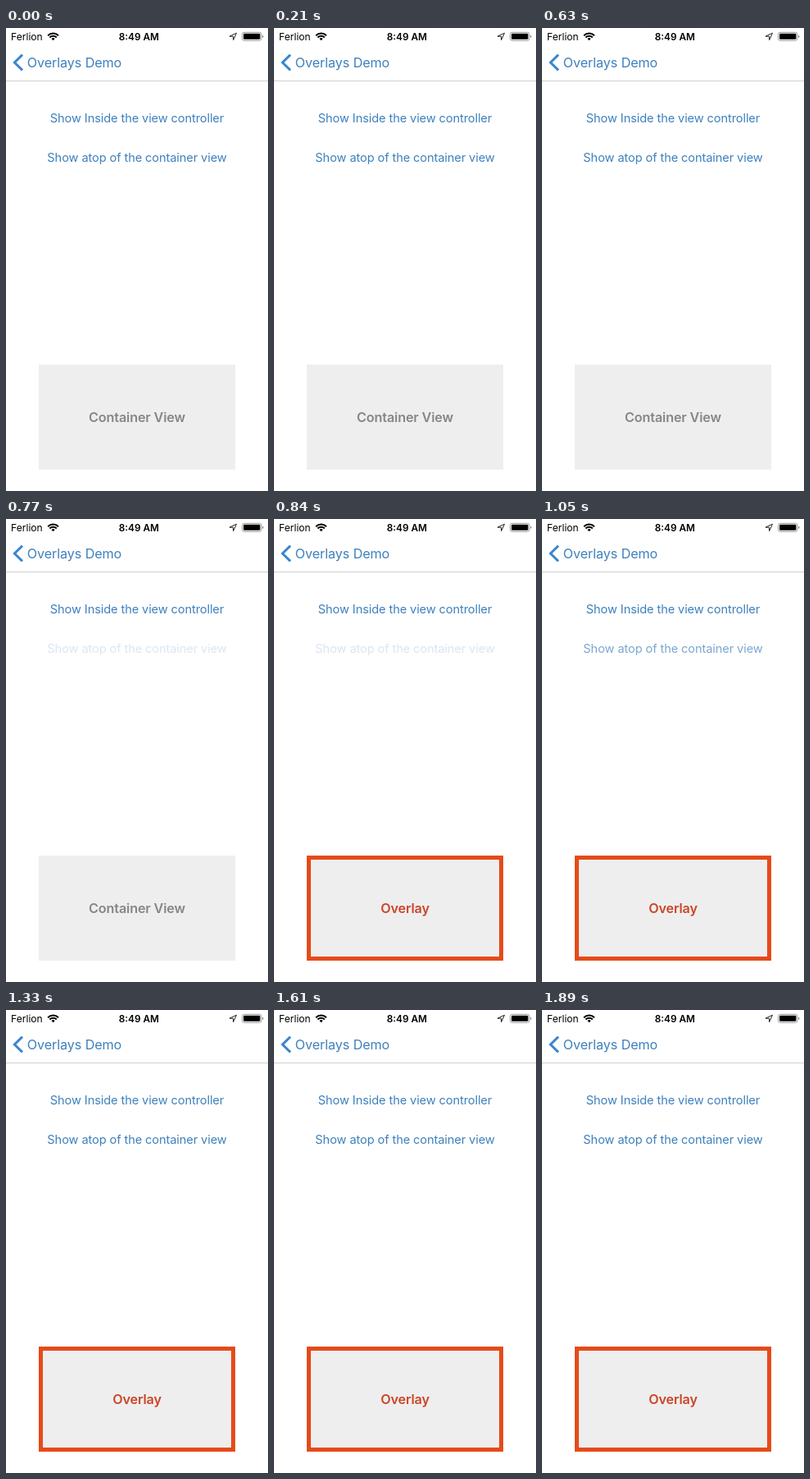
Recreate the animation shown at these times as an HTML page. Size 320 by 564 pixels, loop 1.96 s.

```html
<!DOCTYPE html>
<html lang="en">
<head>
<meta charset="utf-8">
<title>Overlays Demo</title>
<style>
  html, body { margin: 0; width: 100%; height: 100%; overflow: hidden; background: #fff; }
  svg { display: block; width: 100%; height: 100%; }
  text { font-family: Inter, Roboto, sans-serif; }
  .mid { text-anchor: middle; }
  .blue { fill: #3d80bd; }
  .link { font-size: 14.6px; letter-spacing: -.1px; }
  .bold { font-size: 16.2px; font-weight: 600; letter-spacing: -.15px; }
</style>
</head>
<body>
<svg viewBox="0 0 320 564">
  <!-- status bar -->
  <text x="6" y="14.5" font-size="12.1">Ferlion</text>
  <g fill="none" stroke="#000" stroke-width="2">
    <path d="M51.2 9.2a9 9 0 0 1 12.8 0"/>
    <path d="M53.4 11.5a5.9 5.9 0 0 1 8.4 0"/>
  </g>
  <path d="M57.6 15.2l-2.1-2.2a3 3 0 0 1 4.2 0z"/>
  <text class="mid" x="162.3" y="14.5" font-size="11.8" font-weight="600">8:49 AM</text>
  <path d="M273 10.2L281.5 6.2L277.6 14.6V10.2Z" fill="none" stroke="#222" stroke-linejoin="round"/>
  <rect x="288.5" y="5.3" width="23.4" height="10" rx="2.4" fill="none" stroke="#999"/>
  <rect x="290" y="6.8" width="20.4" height="7" rx="1.2"/>
  <path d="M313 8.6q1.5 .5 1.5 1.7t-1.5 1.7z" fill="#999"/>

  <!-- navigation bar -->
  <path d="M20 32.6L10.4 42L20 51.4" fill="none" stroke="#3a87cc" stroke-width="3"/>
  <text class="blue" x="25.8" y="48" font-size="16.2" letter-spacing="-.12">Overlays Demo</text>
  <rect y="64" width="320" height="1" fill="#d0d0d0"/>

  <!-- content -->
  <text class="mid blue link" x="160" y="114.6">Show Inside the view controller</text>
  <text class="mid blue link" id="button" x="160" y="162.6">Show atop of the container view</text>
  <rect x="40" y="410" width="240" height="128" fill="#eee"/>
  <text class="mid bold" id="label" x="160" y="480" fill="#868686">Container View</text>
  <g id="overlay" visibility="hidden">
    <rect x="42.5" y="412.5" width="235" height="123" fill="#eee" stroke="#e64a19" stroke-width="5"/>
    <text class="mid bold" x="160" y="480" fill="#cb4528">Overlay</text>
  </g>
</svg>
<script>
  const LOOP = 1960, STEP = 70, PRESS = 770, SHOW = 840;
  const FADE_START = 820, FADE_TIME = 400, DIM = .19;
  const [button, label, overlay] = ['button', 'label', 'overlay'].map(id => document.getElementById(id));

  function buttonAlpha(t) {
    if (t < PRESS) return 1;
    const u = Math.min(1, Math.max(0, (t - FADE_START) / FADE_TIME));
    return DIM + (1 - DIM) * u * u * (3 - 2 * u);
  }

  function draw(now) {
    const t = Math.floor(now % LOOP / STEP) * STEP;
    const shown = t >= SHOW;
    button.setAttribute('opacity', buttonAlpha(t));
    overlay.setAttribute('visibility', shown ? 'visible' : 'hidden');
    label.setAttribute('visibility', shown ? 'hidden' : 'visible');
  }

  let start;
  function tick(now) {
    start ??= now;
    draw(now - start);
    requestAnimationFrame(tick);
  }
  draw(0);
  requestAnimationFrame(tick);
</script>
</body>
</html>
```
